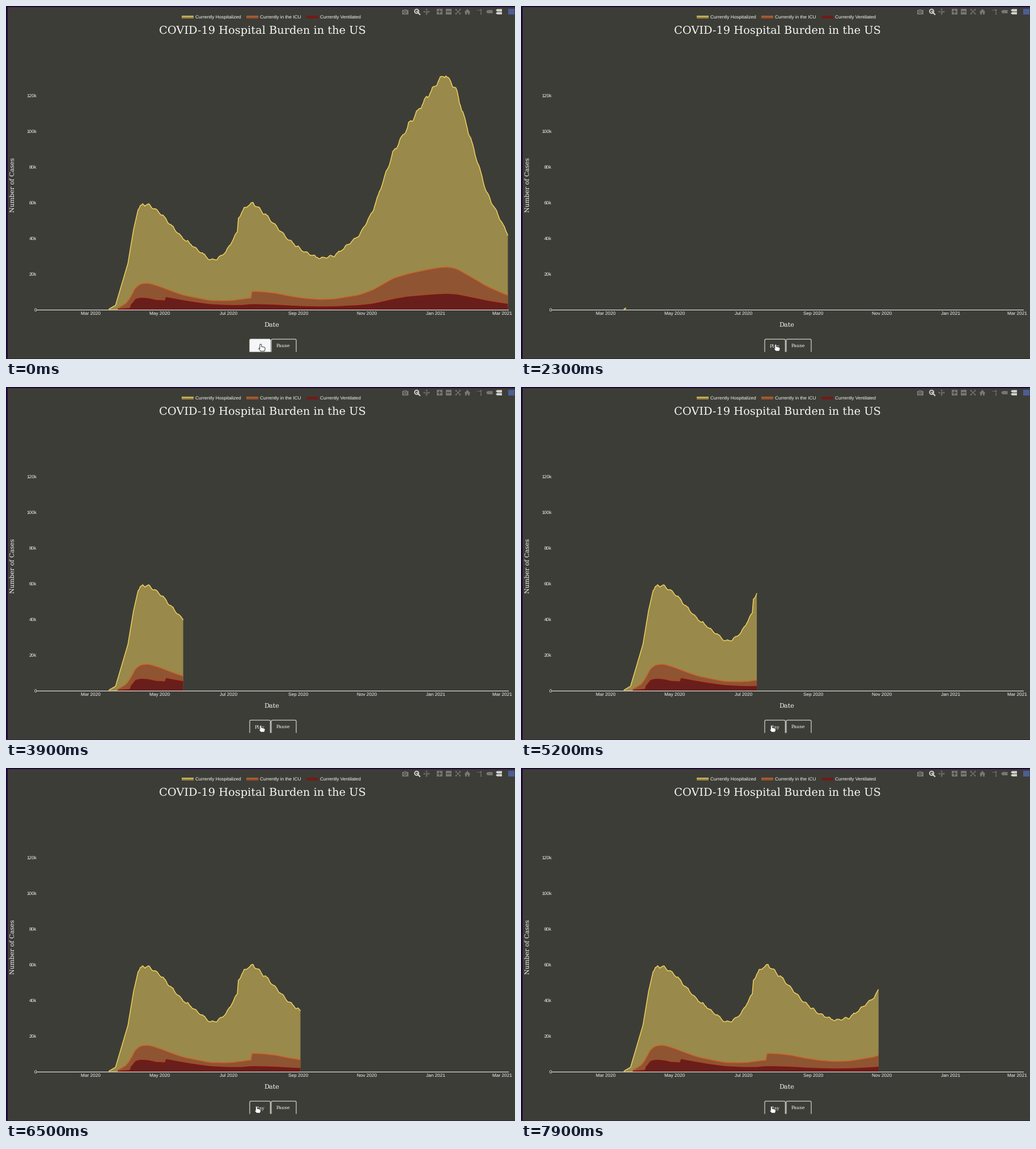
A matplotlib script for the animation above (8 s loop, 898 px wide and 623 px high).

```python
import numpy as np
import matplotlib.pyplot as plt
from matplotlib.animation import FuncAnimation
from matplotlib.patches import Circle, PathPatch, Polygon, Rectangle
from matplotlib.path import Path

W, H, DPI = 898, 623, 128
PT = 72 / DPI             # points per pixel
BASE, K = 536, 3.15       # y of the zero line, pixels per thousand cases
DAY0, DAY_W = 149.5, 1.989
LAST_DAY = 370            # days are counted from 1 March 2020

BG, EDGE, INK = "#3d3d38", "#1f0638", "#f6f6f4"
DIM, LIT = "#777773", "#d3d3d0"
SERIF = "DejaVu Serif"

plt.rcParams["text.hinting"] = "none"
fig = plt.figure(figsize=(W / DPI, H / DPI), dpi=DPI, facecolor=BG)
ax = fig.add_axes([0, 0, 1, 1])
ax.set_xlim(0, W)
ax.set_ylim(H, 0)
ax.axis("off")


def text(x, y, s, size=8.28, font="Liberation Sans", ha="left", **kw):
    return ax.text(x, y, s, fontsize=size * PT, family=font, color=INK,
                   ha=ha, va="baseline", rotation_mode="anchor", **kw)


def line(xs, ys, color=INK, width=1.0, **kw):
    return ax.plot(xs, ys, color=color, lw=width * PT, **kw)[0]


def rect(x0, y0, x1, y1, color):
    ax.add_patch(Rectangle((x0, y0), x1 - x0, y1 - y0, fc=color, lw=0))


def poly(pts, color, **kw):
    return ax.add_patch(Polygon(pts, fc=color, lw=0, **kw))


def disc(x, y, r, color, ring=0):
    ax.add_patch(Circle((x, y), r, fc="none" if ring else color, ec=color, lw=ring * PT))


# ---- data: a trend through a few turning points, then shares of it ----
TREND = [(16, 0.3), (22, 2.5), (26, 11), (33, 26), (38, 45), (42, 56), (46, 59.3),
         (53, 58.2), (62, 54), (80, 41), (106, 28), (112, 28.3), (120, 32.5),
         (130, 43.5), (131, 51.5), (137, 57.3), (144, 59.6), (154, 54), (175, 39.5),
         (189, 32.5), (203, 28.8), (216, 30.2), (238, 41.5), (250, 55), (268, 87.5),
         (283, 104.5), (303, 123.5), (314, 132), (324, 123.5), (332, 106.3),
         (351, 66), (370, 42)]
ICU_SHARE = [(24, .14), (31, .16), (39, .245), (52, .253), (84, .203), (112, .18),
             (134, .108), (142, .11), (143, .172), (165, .197), (270, .2),
             (313, .182), (352, .2), (370, .19)]
VENT_SHARE = [(24, .2), (35, .11), (36, .35), (40, .47), (58, .385), (66, .42),
              (67, .59), (82, .62), (107, .55), (134, .405), (142, .44), (143, .28),
              (201, .27), (250, .285), (280, .355), (370, .375)]


def along(points, day):
    return np.interp(day, *np.transpose(points))


rng = np.random.default_rng(4)
days = np.arange(16, LAST_DAY + 1)
trend = along(TREND, days)
smooth = np.mean([along(TREND, days + s) for s in range(-3, 4)], axis=0)
week = np.cos(2 * np.pi * (days - 163.5) / 7) + rng.normal(0, 0.3, len(days))
hosp = trend + 0.75 * (0.3 + 0.01 * trend) * week * (days > 43)
icu = smooth * along(ICU_SHARE, days)
vent = icu * along(VENT_SHARE, days)

SERIES = [("Currently Hospitalized", 309.5, "#99894a", "#efd35f", hosp, 16),
          ("Currently in the ICU", 423.5, "#8f5431", "#d0602a", icu, 24),
          ("Currently Ventilated", 529.5, "#681f1b", "#8c100e", vent, 24)]

# ---- page edges, titles, axes ----
rect(0, 0, 3, H, EDGE)
rect(0, 0, W, 2, EDGE)
rect(0, 622, W, H, "#2c2636")

text(452, 49, "COVID-19 Hospital Burden in the US", 19.42, SERIF, "center")
text(469, 566, "Date", 11.3, SERIF, "center")
text(14.5, 316, "Number of Cases", 11.04, SERIF, "center", rotation=90)

for k in range(0, 121, 20):
    text(53.8, BASE - K * k + 3, f"{k}k" if k else "0", ha="right")
MONTHS = {"Mar 2020": 0, "May 2020": 61, "Jul 2020": 122, "Sep 2020": 184,
          "Nov 2020": 245, "Jan 2021": 306, "Mar 2021": 365}
for label, day in MONTHS.items():
    text(DAY0 + DAY_W * day, 545, label, ha="center")
line([53.5, 886], [BASE, BASE], zorder=5)

layers = []
for z, (name, lx, fill, stroke, cases, first) in enumerate(SERIES):
    rect(lx, 18, lx + 21, 22, fill)
    line([lx, lx + 21], [18, 18], stroke, 1.5, solid_capstyle="butt")
    text(lx + 24.5, 22.5, name)
    area = poly([(0, 0)] * 3, fill, zorder=2 + 0.1 * z)
    top = line([], [], stroke, 1.5, zorder=3 + 0.1 * z,
               solid_joinstyle="round", solid_capstyle="butt")
    layers.append((area, top, cases, first))


# ---- toolbar ----
def sign_box(x, plus):
    rect(x - 5, 5, x + 5, 15, DIM)
    line([x - 3, x + 3], [10, 10], BG, 1.5)
    if plus:
        line([x, x], [7, 13], BG, 1.5)


def arrows(cx, cy, r, turn):
    """Four arrows pointing outwards from a centre."""
    c = np.array([cx, cy])
    for a in turn + np.arange(4) * np.pi / 2:
        u = np.array([np.cos(a), np.sin(a)])
        v = np.array([-u[1], u[0]])
        neck = c + (r - 2.4) * u
        poly([c + r * u, neck + 2 * v, neck - 2 * v], DIM)
        line(*zip(c, neck), DIM, 1.2)


def tag(x, y, w, h, color):
    poly([(x, y), (x + 2.5, y - h), (x + w, y - h), (x + w, y + h), (x + 2.5, y + h)], color)


rect(698.5, 7, 709.5, 14.5, DIM)  # camera
rect(701.5, 5.5, 706.5, 8, DIM)
disc(704, 10.6, 2.8, BG)
disc(704, 10.6, 1.7, DIM)

disc(724.5, 9.3, 3.6, LIT, ring=1.8)  # magnifier
line([727.2, 730], [12, 14.8], LIT, 2.2)
line([722.7, 726.3], [9.3, 9.3], LIT)
line([724.5, 724.5], [7.5, 11.1], LIT)

arrows(742, 10, 5.8, 0)
sign_box(764.5, True)
sign_box(781, False)
arrows(797.5, 10, 6.8, np.pi / 4)

poly([(808.5, 10.8), (814, 5), (819.5, 10.8)], DIM)  # house
rect(810, 10, 818, 15, DIM)
rect(812.8, 12, 815.2, 15, BG)

for px, py in [(831, 6.5), (834, 6.5), (837, 10), (837, 13)]:
    rect(px, py, px + 1.7, py + 1.6, DIM)
disc(837.8, 7.2, 1.5, DIM)

tag(847, 10, 11.5, 2.9, DIM)
tag(864, 7.5, 11, 2.1, LIT)
tag(864, 12.7, 11, 2.1, LIT)
rect(886, 5, 897, 15, "#4c5d96")


# ---- buttons and pointer ----
def button(x0, x1, label):
    top, low, r = 588, 610.5, 2
    pts = [(x0, low), (x0, top + r), (x0, top), (x0 + r, top),
           (x1 - r, top), (x1, top), (x1, top + r), (x1, low)]
    codes = [Path.MOVETO, Path.LINETO, Path.CURVE3, Path.CURVE3,
             Path.LINETO, Path.CURVE3, Path.CURVE3, Path.LINETO]
    box = ax.add_patch(PathPatch(Path(pts, codes), fc=BG, ec=INK, lw=PT))
    text((x0 + x1) / 2 - 0.8, 602, label, 8.28, SERIF, "center")
    return box


play = button(430, 466.3, "Play")
button(468, 512, "Pause")

HAND = 1.1 * np.array([(-1.3, 0.6), (0, -0.4), (1.3, 0.6), (1.4, 3.8), (5.6, 4.7),
                       (7, 5.8), (7, 8), (6, 11), (0, 11), (-3, 7.2), (-2.5, 6),
                       (-1.3, 6.8)])
hand = ax.add_patch(Polygon(HAND, fc="white", ec="#25252a", lw=0.9 * PT, zorder=9,
                            joinstyle="round"))


def last_day(n):
    """Last visible day: full chart, then empty, then four days per step."""
    if n < 7:
        return LAST_DAY
    return 50 + 4 * (n - 31) if n >= 23 else -1


def draw(n):
    end = last_day(n)
    for area, top, cases, first in layers:
        shown = (days >= first) & (days <= end)
        x = DAY0 + DAY_W * days[shown]
        y = BASE - K * cases[shown]
        top.set_data(x, y)
        area.set_visible(len(x) > 1)
        if len(x) > 1:
            area.set_xy([(x[0], BASE), *zip(x, y), (x[-1], BASE)])
    play.set_facecolor("#f4f6f8" if n < 7 else BG)
    hand.set_xy(HAND + (449.3 + np.interp(n, [43, 47], [0, -7.5]), 597))
    return []


anim = FuncAnimation(fig, draw, frames=80, interval=100, init_func=lambda: draw(0),
                     repeat=True, repeat_delay=0, blit=False)
plt.show()
```
